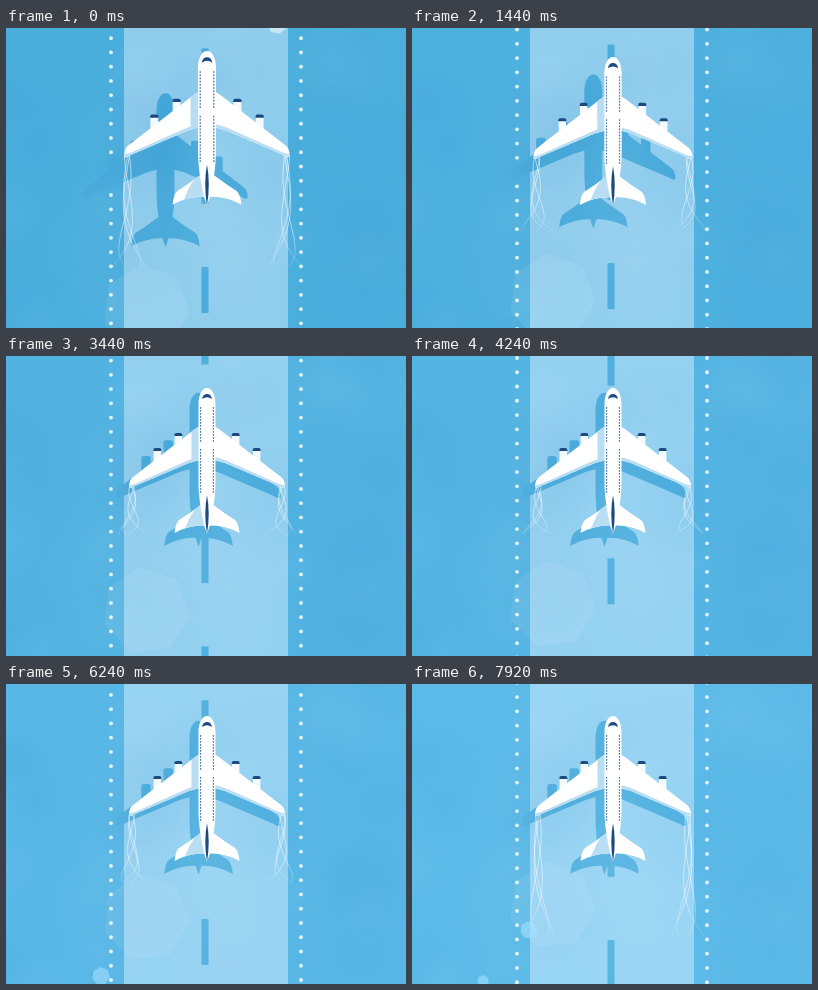
These frames come from a looping animation (400x300 px, 8000 ms). An HTML page with a canvas:

```html
<!DOCTYPE html>
<html lang="en">
<head>
<meta charset="utf-8">
<title>Plane over runway</title>
<style>
html, body { margin: 0; width: 100%; height: 100%; overflow: hidden; background: #4fb1e1; }
canvas { display: block; }
</style>
</head>
<body>
<canvas id="stage" width="400" height="300"></canvas>
<script>
const ctx = document.getElementById('stage').getContext('2d');
const LOOP = 8000, STEP = 80, DASH_GAP = 109.3, DOT_GAP = DASH_GAP * 3 / 23;
const CX = 201, PIVOT_Y = 182, NAVY = '#1c4a80', SHADE = '#b9def4';

const mix = (a, b, k) => a + (b - a) * k;
const rgb = (a, b, k) => `rgb(${a.map((v, i) => Math.round(mix(v, b[i], k)))})`;

function along(keys, t) {
  let i = 1;
  while (i < keys.length - 1 && t > keys[i][0]) i++;
  const [t0, a] = keys[i - 1], [t1, b] = keys[i];
  return mix(a, b, (t - t0) / (t1 - t0));
}

// Soft static mottling of the paper
let seed = 7;
const rand = () => (seed = seed * 16807 % 2147483647) / 2147483647;
const blots = Array.from({ length: 36 }, (_, i) => ({
  x: rand() * 400, y: rand() * 300, r: 25 + rand() * 50,
  tone: i % 2 ? '255,255,255' : '0,95,165'
}));

function drawPaper() {
  for (const { x, y, r, tone } of blots) {
    const g = ctx.createRadialGradient(x, y, 0, x, y, r);
    g.addColorStop(0, `rgba(${tone},.03)`);
    g.addColorStop(1, `rgba(${tone},0)`);
    ctx.fillStyle = g;
    ctx.fillRect(x - r, y - r, 2 * r, 2 * r);
  }
}

// Plane parts, relative to the centre line
const body = new Path2D('M0 32C-5 32-8.5 39-8.5 48V125C-8.5 145-5 158-3 169L0 178L3 169C5 158 8.5 145 8.5 125V48C8.5 39 5 32 0 32Z');
const wing = new Path2D('M7 70L12 73L74 121Q78 124 78 131Q76 133 72 130L18 107L7 104Z');
const wingEdge = new Path2D('M78 129.5Q78 133 72 130L18 107L8 104V101L18 104L72 128Z');
const wingShade = new Path2D('M7 70L12 73L15.5 75.7V106L7 104Z');
const tail = new Path2D('M5 148L18 157.5L28 164Q31.5 167 32.5 177Q25 173 19 171.5Q10 169 2 169.5Z');
const tailShade = new Path2D('M5 148L12 153L17 161L22 172.3L19 171.5Q10 169 2 169.5Z');
const fin = new Path2D('M0 139Q3.4 157 0 178Q-3.4 157 0 139Z');
const cockpit = new Path2D('M-5 43Q-4 38 0 38Q4 38 5 43Q0 39.5-5 43Z');
const engines = [[28.7, 77], [49.7, 92]];

function placed(dx, dy, scale, draw) {
  ctx.save();
  ctx.translate(CX + dx, PIVOT_Y + dy);
  ctx.scale(scale, scale);
  ctx.translate(0, -PIVOT_Y);
  draw();
  ctx.restore();
}

function bothSides(draw) {
  for (const side of [-1, 1]) {
    ctx.save();
    ctx.scale(side, 1);
    draw(side);
    ctx.restore();
  }
}

function drawShadow(color) {
  ctx.fillStyle = color;
  bothSides(() => {
    ctx.fill(wing);
    ctx.fill(tail);
    for (const [x, y] of engines) {
      ctx.beginPath();
      ctx.roundRect(x - 4.5, y, 9, 17, 2);
      ctx.fill();
    }
  });
  ctx.fill(body);
}

function drawEngine(x, y) {
  ctx.fillStyle = '#f3fafd';
  ctx.fillRect(x - 3.7, y + 1, 7.4, 12);
  ctx.fillStyle = NAVY;
  ctx.beginPath();
  ctx.roundRect(x - 4, y, 8, 3, [2, 2, 0, 0]);
  ctx.fill();
}

function drawPlane() {
  bothSides(side => {
    for (const [x, y] of engines) drawEngine(x, y);
    ctx.fillStyle = '#fff';
    ctx.fill(wing);
    ctx.fill(tail);
    ctx.fillStyle = SHADE;
    ctx.fill(wingEdge);
    if (side < 0) {
      ctx.fill(wingShade);
      ctx.fill(tailShade);
    }
  });
  ctx.fillStyle = '#fff';
  ctx.fill(body);
  ctx.fillStyle = NAVY;
  ctx.fill(cockpit);
  ctx.fill(fin);
  ctx.fillStyle = '#557fa9';
  for (let y = 51; y < 138; y += 3) {
    if (y > 86 && y < 92) continue;
    ctx.fillRect(-7, y, 1.2, 1.8);
    ctx.fillRect(5.8, y, 1.2, 1.8);
  }
}

const trailLength = [[0, 105], [1440, 72], [2560, 52], [3440, 48], [4960, 46], [6240, 68], [8000, 124]];

function drawTrails(t) {
  const len = along(trailLength, t);
  const g = ctx.createLinearGradient(0, 131, 0, 131 + len);
  g.addColorStop(0, 'rgba(255,255,255,.75)');
  g.addColorStop(.7, 'rgba(255,255,255,.65)');
  g.addColorStop(1, 'rgba(255,255,255,.15)');
  ctx.strokeStyle = g;
  ctx.lineWidth = .7;
  bothSides(() => {
    for (let j = 0; j < 4; j++) {
      ctx.beginPath();
      for (let u = 0; u <= 1.001; u += .04) {
        const sway = Math.sin(j * 1.9 + u * 5.5 - t / 1300) * (3 + 2 * u + 12 * u ** 5);
        ctx.lineTo(75 + sway, 131 + u * len);
      }
      ctx.stroke();
    }
  });
}

function ghost(x, y, r, tone, turn) {
  ctx.beginPath();
  for (let i = 0; i < 7; i++) {
    const a = turn + i * Math.PI * 2 / 7;
    ctx.lineTo(x + r * Math.cos(a), y + r * Math.sin(a));
  }
  ctx.fillStyle = `rgba(${tone})`;
  ctx.fill();
}

function drawFlare(t) {
  const rise = (x, y, t0) => [x + (t - t0) * .0131, y - (t - t0) * .0274];
  ghost(140, 280 - t * .0074, 44, '255,255,255,.07', .1);
  ghost(...rise(271, -4, 0), 10, '255,255,255,.5', .4);
  ghost(...rise(95, 292, 6240), 9, '165,226,255,.55', .2);
  ghost(...rise(71, 297, 7920), 6, '165,226,255,.55', .2);
}

function render(t) {
  const k = t / LOOP;
  const shade = rgb([71, 170, 219], [86, 180, 226], k);
  const slow = (Math.max(0, t - 3643) * .00162) ** 2.2;
  const run = t * .3009 - slow;
  const settle = Math.max(0, 1 - t / 3440) ** 2;

  ctx.fillStyle = rgb([74, 174, 221], [92, 186, 232], k);
  ctx.fillRect(0, 0, 400, 300);
  ctx.fillStyle = rgb([143, 205, 237], [153, 213, 244], k);
  ctx.fillRect(118, 0, 164, 300);

  ctx.fillStyle = shade;
  for (let y = (20.4 + run) % DASH_GAP - DASH_GAP; y < 300; y += DASH_GAP) {
    ctx.fillRect(195.5, y, 7, 46);
  }
  ctx.fillStyle = '#e6f5fc';
  for (let y = (10.2 + run) % DOT_GAP - DOT_GAP; y < 304; y += DOT_GAP) {
    for (const x of [105, 295]) {
      ctx.beginPath();
      ctx.arc(x, y, 1.9, 0, Math.PI * 2);
      ctx.fill();
    }
  }

  // The shadow melts into the ground beside the runway
  placed(-8.5 - 33 * settle, 13 + 28.5 * settle, 1.055, () => drawShadow(shade));
  drawPaper();
  placed(0, 0, 1 + .06 * settle, () => {
    drawTrails(t);
    drawPlane();
  });
  drawFlare(t);
}

const start = performance.now();
function frame() {
  const t = (performance.now() - start) % LOOP;
  render(Math.floor(t / STEP) * STEP);
  requestAnimationFrame(frame);
}
frame();
</script>
</body>
</html>
```
